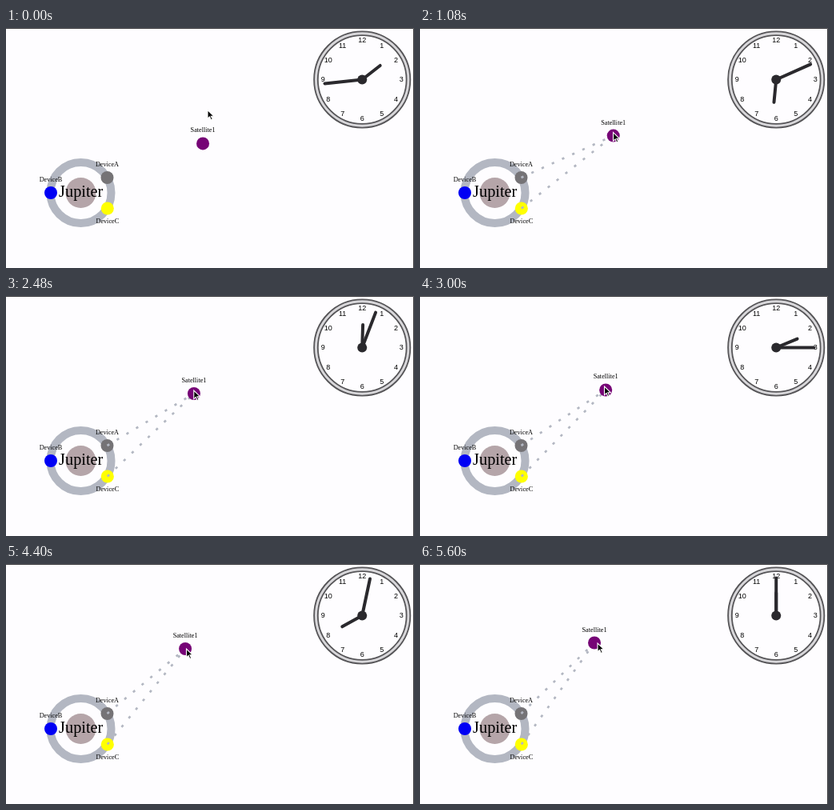
These frames come from a looping animation (510 by 300 pixels, 5.64 s). An HTML page:

```html
<!DOCTYPE html>
<html lang="en">
<head>
<meta charset="utf-8">
<title>Satellite contact</title>
<style>
  html, body { margin: 0; width: 100%; height: 100%; overflow: hidden; background: #fefdff; }
  svg { display: block; width: 510px; height: 300px; }
  text { font: 8.2px "Liberation Serif", Times, serif; text-anchor: middle; }
  #planet { font-size: 20.3px; }
  #digits text { font: 9px "Liberation Sans", Arial, sans-serif; }
  #links { stroke: #b3b7c2; stroke-width: 2.7; stroke-dasharray: 3.2 10.8; }
  #hands { stroke: #2a292d; stroke-width: 4; stroke-linecap: round; }
</style>
</head>
<body>
<svg viewBox="0 0 510 300">
  <path d="M0 .5H509.5V300" fill="none" stroke="#38373b"/>

  <circle cx="93.5" cy="206" r="38" fill="none" stroke="#b3b7c2" stroke-width="10"/>
  <circle cx="93.5" cy="206" r="19" fill="#b5a5a9"/>
  <text id="planet" x="93.7" y="211">Jupiter</text>
  <g id="devices"></g>
  <g id="links"><line x1="126.5" y1="187"/><line x1="126.8" y1="225.5"/></g>
  <g id="satellite">
    <circle r="8" fill="#760476"/>
    <text y="-14">Satellite1</text>
  </g>

  <g transform="translate(445.2 64.5)">
    <g fill="none">
      <circle r="58" stroke="#d8d7da" stroke-width="4"/>
      <circle r="60.1" stroke="#565558" stroke-width="1.8"/>
      <circle r="55.4" stroke="#565558" stroke-width="1.8"/>
    </g>
    <g id="digits"></g>
    <g id="hands"><line id="hour" y2="-28.5"/><line id="minute" y2="-47"/></g>
    <circle r="6" fill="#2a292d"/>
  </g>

  <path id="cursor" d="M0 0V10.8L2.5 8.4 4.3 12.4 6.2 11.6 4.4 7.7H7.8Z" fill="#000" stroke="#fff" stroke-width="1.1"/>
</svg>
<script>
const LOOP = 5640, STEP = 40;
const $ = id => document.getElementById(id);

// time in ms, simulated minutes, cursor x, cursor y
const keys = [
  [0, 104, 252, 102.5],
  [1080, 371, 241.5, 130.5],
  [1960, 592, 239, 123],
  [3000, 855, 230.5, 113],
  [3800, 1052, 228, 108],
  [4400, 1202, 225.5, 106],
  [5360, 1440, 222, 99],
];

function sample(t) {
  const i = keys.findIndex(k => k[0] > t);
  if (i < 0) return keys[keys.length - 1];
  const a = keys[i - 1], b = keys[i], f = (t - a[0]) / (b[0] - a[0]);
  return a.map((v, j) => v + (b[j] - v) * f);
}

$('devices').innerHTML = [
  ['DeviceA', 126.5, 187, '#757376', -14],
  ['DeviceB', 56, 206, '#0000f4', -13.7],
  ['DeviceC', 126.8, 225.5, '#ffff00', 18],
].map(([name, x, y, color, dy]) =>
  `<circle cx="${x}" cy="${y}" r="8" fill="${color}"/><text x="${x}" y="${y + dy}">${name}</text>`
).join('');

for (let n = 1; n <= 12; n++) {
  const a = n * Math.PI / 6;
  $('digits').innerHTML += `<text x="${49 * Math.sin(a)}" y="${2.8 - 49 * Math.cos(a)}">${n}</text>`;
}

function draw(t) {
  const [, minutes, cx, cy] = sample(t);
  $('minute').setAttribute('transform', `rotate(${minutes * 6})`);
  $('hour').setAttribute('transform', `rotate(${minutes / 2})`);

  const a = (20.5 + minutes * 0.0141) * Math.PI / 180;
  const x = 93.5 + 164.5 * Math.cos(a), y = 206 - 164.5 * Math.sin(a);
  $('satellite').setAttribute('transform', `translate(${x} ${y})`);
  for (const link of $('links').children) {
    link.setAttribute('x2', x);
    link.setAttribute('y2', y);
  }
  $('links').style.display = t < STEP ? 'none' : '';
  $('cursor').setAttribute('transform', `translate(${cx} ${cy})`);
}

const start = performance.now();
function tick() {
  const t = (performance.now() - start) % LOOP;
  draw(Math.floor(t / STEP) * STEP);
  requestAnimationFrame(tick);
}
tick();
</script>
</body>
</html>
```
